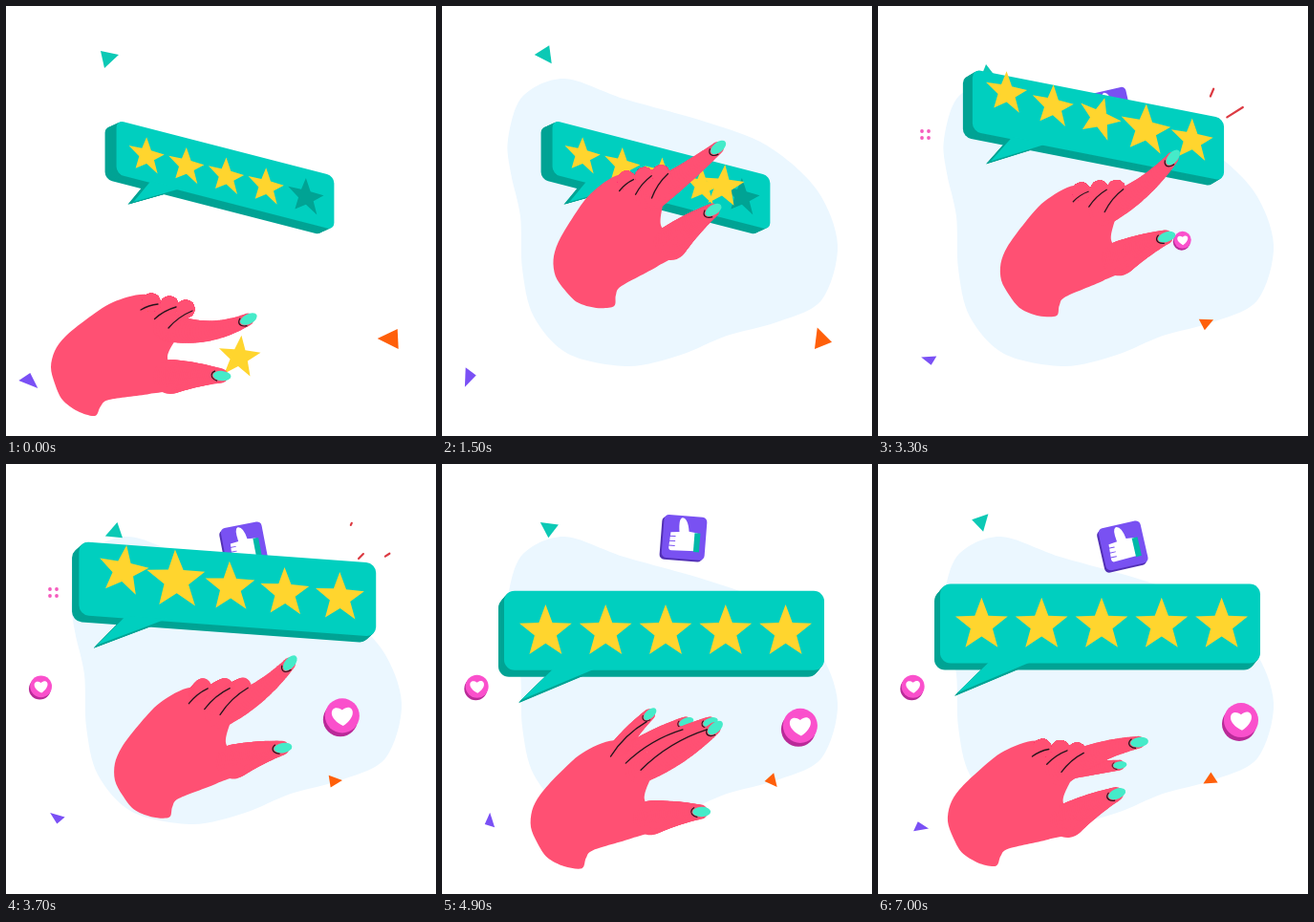
Animation, 450 px wide and 450 px high, one loop 7.1 s. Source, as an HTML page with a canvas:

```html
<!DOCTYPE html>
<html lang="en">
<head>
<meta charset="utf-8">
<title>Five star rating</title>
<style>
  html, body { margin: 0; width: 100%; height: 100%; overflow: hidden; background: #fff; }
  canvas { display: block; width: 100vmin; height: 100vmin; }
</style>
</head>
<body>
<canvas id="stage" width="450" height="450"></canvas>
<script>
const ctx = document.getElementById('stage').getContext('2d');
const LOOP = 7100, STEP = 100, RAD = Math.PI / 180;
const TEAL = '#00cfbf', DEEP = '#00a394', YELLOW = '#ffd52e', PINK = '#ff5073',
      NAIL = '#45ebc9', PURPLE = '#7951f2', INK = '#25151c';

const lerp = (a, b, u) => a + (b - a) * u;
const ramp = (t, from, to) => Math.min(1, Math.max(0, (t - from) / (to - from)));
const ease = (t, from, to) => { const u = ramp(t, from, to); return u * u * (3 - 2 * u); };
const bump = (x, half) => Math.abs(x) < half ? Math.cos(x / half * Math.PI / 2) ** 2 : 0;

// Eased interpolation between rows [time, ...values]
function at(keys, t) {
  const i = Math.max(0, keys.findLastIndex(k => k[0] <= t)), from = keys[i], to = keys[i + 1] || from;
  const u = ease(t, from[0], to[0] + 1e-9);
  return from.slice(1).map((v, n) => lerp(v, to[n + 1], u));
}

function placed(x, y, angle, scale, draw) {
  ctx.save();
  ctx.translate(x, y);
  ctx.rotate(angle * RAD);
  ctx.scale(scale, scale);
  draw();
  ctx.restore();
}
function fill(color) {
  ctx.fillStyle = color;
  ctx.fill();
}
function disc(x, y, r, color) {
  ctx.beginPath();
  ctx.arc(x, y, r, 0, 7);
  fill(color);
}
function polygon(points, color) {
  ctx.beginPath();
  points.forEach(p => ctx.lineTo(...p));
  ctx.closePath();
  fill(color);
}
function smooth(points, color) {
  const n = points.length, p = i => points[(i + n) % n];
  ctx.beginPath();
  ctx.moveTo(...p(0));
  for (let i = 0; i < n; i++) {
    const [a, b, c, d] = [p(i - 1), p(i), p(i + 1), p(i + 2)];
    ctx.bezierCurveTo(b[0] + (c[0] - a[0]) / 6.5, b[1] + (c[1] - a[1]) / 6.5,
      c[0] - (d[0] - b[0]) / 6.5, c[1] - (d[1] - b[1]) / 6.5, ...c);
  }
  fill(color);
}
// Control point of an arc that leaves its chord sideways by a share of its length
const bent = ([ax, ay], [bx, by], bend) =>
  [(ax + bx) / 2 - (by - ay) * bend, (ay + by) / 2 + (bx - ax) * bend];
function arc(a, b, bend, color, width) {
  ctx.beginPath();
  ctx.moveTo(...a);
  ctx.quadraticCurveTo(...bent(a, b, bend), ...b);
  ctx.strokeStyle = color;
  ctx.lineWidth = width;
  ctx.lineCap = 'round';
  ctx.stroke();
}
function star(radius, color) {
  polygon(Array.from({ length: 10 }, (_, i) => {
    const r = i % 2 ? radius * 0.42 : radius, a = (i * 36 - 90) * RAD;
    return [r * Math.cos(a), r * Math.sin(a)];
  }), color);
}

const BLOB = [[69, 140], [84, 95], [128, 76], [190, 97], [275, 121], [340, 146], [392, 192], [414, 250],
  [397, 308], [350, 331], [298, 345], [250, 365], [195, 377], [132, 364], [96, 325], [84, 275], [82, 220], [72, 175]];

// Triangles spin steadily while drifting between four stops
const STOPS = [0, 0.8, 3.3, 7];
const TRIANGLES = [
  { color: '#0cc9b5', corners: [[-8, -7], [11, -3], [-4, 11]], shrink: 0.06,
    path: [[107, 54], [107, 46], [114, 72], [108, 60]] },
  { color: '#7a50f5', corners: [[-10.7, 0], [1.3, -8], [9.3, 8]], shrink: 0.25,
    path: [[24, 392], [22, 392], [54, 370], [44, 380]] },
  { color: '#ff5f0a', corners: [[-14.3, 0], [6.7, -10], [7.7, 11]], shrink: 0.38,
    path: [[403, 348], [410, 353], [343, 332], [348, 330]] }
];
function drawTriangle({ color, corners, shrink, path }, t) {
  const [x, y] = at(path.map((p, i) => [STOPS[i], ...p]), t);
  placed(x, y, 47 * t, 1 - shrink * ease(t, 0.8, 3.3), () => polygon(corners, color));
}

// Once the last star is placed the bubble hops, grows and turns to the front
const PLACED = 2.9, SLOT = [314, 198];
const drift = t => ramp(t, 4.1, 7);

function drawBubble(t) {
  const grow = ease(t, 2.8, 4.1), size = lerp(0.68, 1, grow), shear = 0.257 * (1 - grow ** 1.3);
  const x = lerp(230.5, 234, grow);
  const y = 177.5 - 56 * Math.sin(Math.PI * ramp(t, 2.8, 4.1)) - 10 * drift(t);
  const sheared = (dx, dy, draw) => {
    ctx.save();
    ctx.transform(size, size * shear, 0, size, x + dx, y + dy);
    draw();
    ctx.restore();
  };
  const panel = color => {
    ctx.beginPath();
    ctx.roundRect(-169, -42, 335, 83, 11);
    fill(color);
  };
  const tail = color => polygon([[-116, 38], [-151 + 32 * shear, 72 + 20 * shear], [-70, 38]], color);
  for (let i = 8; i >= 0; i--) {
    const dx = lerp(-12, -6, grow) * i / 8, dy = lerp(5.5, 7, grow) * i / 8, color = i ? DEEP : TEAL;
    sheared(dx, dy, () => panel(color));
    sheared(dx / 2, dy / 2, () => tail(color));
  }

  // Stars trail behind the bubble, the leftmost most of all
  const early = 16 * bump(t - 3.3, 0.4), late = bump(t - 4.1, 0.7);
  for (let i = 0; i < 5; i++) {
    const lag = late * 0.53 ** i, pop = 3.9 - i * 0.2;
    sheared(14 * lag, -31 * lag - early * 0.72 ** i, () =>
      placed((i - 2) * lerp(61.3, 62.8, grow), 1, 14 * bump(t - pop + 0.2, 0.25) - 17 * lag,
        1 + 0.2 * bump(t - pop, 0.25), () => star(28.8, i === 4 && t < PLACED ? DEEP : YELLOW)));
  }
}

function drawCard(t) {
  if (t < 3) return;
  const rise = ease(t, 2.8, 4.1), angle = -4 + 9 * Math.cos(2 * Math.PI * (t - 5.1) / 3.6);
  placed(238 + 14 * rise + 4 * drift(t), 125 - 52 * rise + 12 * drift(t), angle, lerp(0.85, 1, rise), () => {
    [[-2, 2, '#5230b5'], [0, 0, PURPLE]].forEach(([dx, dy, color]) => {
      ctx.beginPath();
      ctx.roundRect(-22 + dx, -22 + dy, 45, 45, 5);
      fill(color);
    });
    ctx.fillStyle = '#fff';
    ctx.fill(new Path2D('M-14 -4L-5 -5Q-7 -19 -3 -20Q3 -20 5 -6L14 -5V14L-12 15Q-15 15 -15 12Z'));
    ctx.fillStyle = '#00b8a8';
    ctx.fillRect(11, -5, 6, 20);
    [0, 5, 10].forEach(v => arc([-15, v], [-9, v], 0, PURPLE, 1));
  });
}

function drawHeart(x, y, r) {
  if (r > 0) placed(x, y, 0, r / 20, () => {
    disc(-1, 2, 18.5, '#b92a98');
    disc(1, -2, 18.5, '#fa50cc');
    ctx.fillStyle = '#fff';
    ctx.fill(new Path2D('M2 9C-18 -1 -10 -16 1 -8C11 -17 20 -3 2 9Z'));
  });
}
function drawHearts(t) {
  const fly = ease(t, 3.1, 4.1), d = drift(t);
  drawHeart(36, 234, 13 * ease(t, 3.4, 3.8) + 6.5 * bump(t - 4.05, 0.5));
  drawHeart(312 + 60 * fly + 7 * d, 242 + 36 * fly - 8 * d, 19.5 * ramp(t, 3.1, 3.5));
}

function drawBurst(t) {
  // angle, length, start
  [[-67, 10, 3.2], [-32, 23, 3.2], [-45, 10, 3.5]].forEach(([angle, length, start]) => {
    const u = (t - start) / 0.65;
    if (u <= 0 || u > 1) return;
    placed(329, 139, angle, 1, () => {
      const d = 45 + 49 * u, half = length * (1 - u) / 2;
      arc([d - half, 0], [d + half, 0], 0, '#dc3a42', 2.2);
    });
  });
  const dot = 1.9 * (ease(t, 3.1, 3.3) - ease(t, 4.1, 4.5));
  if (dot > 0) for (let i = 0; i < 4; i++) disc(46 + 7 * (i % 2), 131 + 7 * (i >> 1), dot, '#f55bbd');
}

// Hand poses: time, wrist x and y, turn, heights of index and thumb tips, index bend, finger spread
const HAND = [
  [0, 47, 378, 0, -50, 9, 0.19, 0],
  [0.8, 107, 297, -19, -65, -2, 0.1, 0],
  [2.4, 136, 262, -23, -67, -13, -0.08, 0],
  [3.3, 129, 287, -15, -77, 1, 0.11, 0],
  [4.1, 99, 375, -12, -75, 15, 0.12, 0.4],
  [4.9, 93, 380, -9, -72, 12, 0.1, 1],
  [6.3, 73, 374, -5, -65, -13, -0.1, 0]
];
const PALM = [[0, 0], [4, -17], [15, -32], [37, -50], [65, -68], [100, -76], [130, -60], [136, -40],
  [122, -10], [136, 20], [103, 28], [61, 34], [52, 41], [46, 51], [28, 46], [12, 34], [4, 17]];
const FINGERS = [{ curled: [105, -68], open: [141, -97] }, { curled: [124, -65], open: [177, -83] },
  { curled: [141, -61], open: [202, -79] }];
const INDEX_ROOT = [122, -42], THUMB_ROOT = [125, 10];

// Tapering finger with an optional nail along its last stretch
function finger(root, tip, bend, thick, thin, nail) {
  const mid = bent(root, tip, bend);
  for (let u = 0; u <= 1; u += 1 / 32) {
    const on = n => (1 - u) ** 2 * root[n] + 2 * u * (1 - u) * mid[n] + u * u * tip[n];
    disc(on(0), on(1), lerp(thick, thin, u), PINK);
  }
  if (nail <= 0) return;
  const angle = Math.atan2(tip[1] - mid[1], tip[0] - mid[0]) / RAD;
  placed(...tip, angle, nail, () => {
    ctx.beginPath();
    ctx.ellipse(1, 0, 9.5, 5.2, 0, 0, 7);
    fill(NAIL);
    ctx.beginPath();
    ctx.ellipse(0, 0, 10, 6, 0, 110 * RAD, 230 * RAD);
    ctx.strokeStyle = INK;
    ctx.lineWidth = 1.2;
    ctx.stroke();
  });
}

function drawHand(t) {
  const [x, y, turn, indexY, thumbY, bend, spread] = at(HAND, t);
  if (t < PLACED) {
    // The held star sits between both tips until it slides into its slot
    const c = Math.cos(turn * RAD), s = Math.sin(turn * RAD), px = 197, py = (indexY + thumbY) / 2 + 10;
    const go = ease(t, 2.4, PLACED);
    placed(lerp(x + px * c - py * s, SLOT[0], go), lerp(y + px * s + py * c, SLOT[1], go),
      6 * (1 - go), 1, () => star(lerp(23, 20, go), YELLOW));
  }
  placed(x, y, turn, 1, () => {
    const curl = ease(t, 5.3, 6.3);
    finger(INDEX_ROOT, [lerp(140, 184, curl), -43], 0, 10, 5.5, 0.75 * curl);
    smooth(PALM, PINK);
    const tips = FINGERS.map(({ curled, open }) => curled.map((v, n) => lerp(v, open[n], spread)));
    tips.forEach((tip, i) => finger(FINGERS[i].curled, tip, -0.05, 9.5, lerp(9.5, 6, spread), 0.85 * (2 * spread - 1)));
    finger(INDEX_ROOT, [206, indexY], bend, 15, 6.5, 1);
    finger(THUMB_ROOT, [178, thumbY], -0.05, 18, 7.5, 1);
    tips.forEach((tip, i) => arc([94 + 14.5 * i, -60 + 9.5 * i],
      [tip[0] + 7 - 11 * spread, tip[1] + 2 + 5 * spread], -0.12, INK, 1.3));
  });
}

function draw(ms) {
  const t = ms / 1000;
  ctx.fillStyle = '#fff';
  ctx.fillRect(0, 0, 450, 450);
  if (ms >= STEP) smooth(BLOB, '#ebf7ff');
  TRIANGLES.forEach(triangle => drawTriangle(triangle, t));
  drawCard(t);
  drawBubble(t);
  drawBurst(t);
  drawHearts(t);
  drawHand(t);
}

const begin = performance.now();
function tick() {
  const ms = (performance.now() - begin) % LOOP;
  draw(Math.floor(ms / STEP) * STEP);
  requestAnimationFrame(tick);
}
tick();
</script>
</body>
</html>
```
